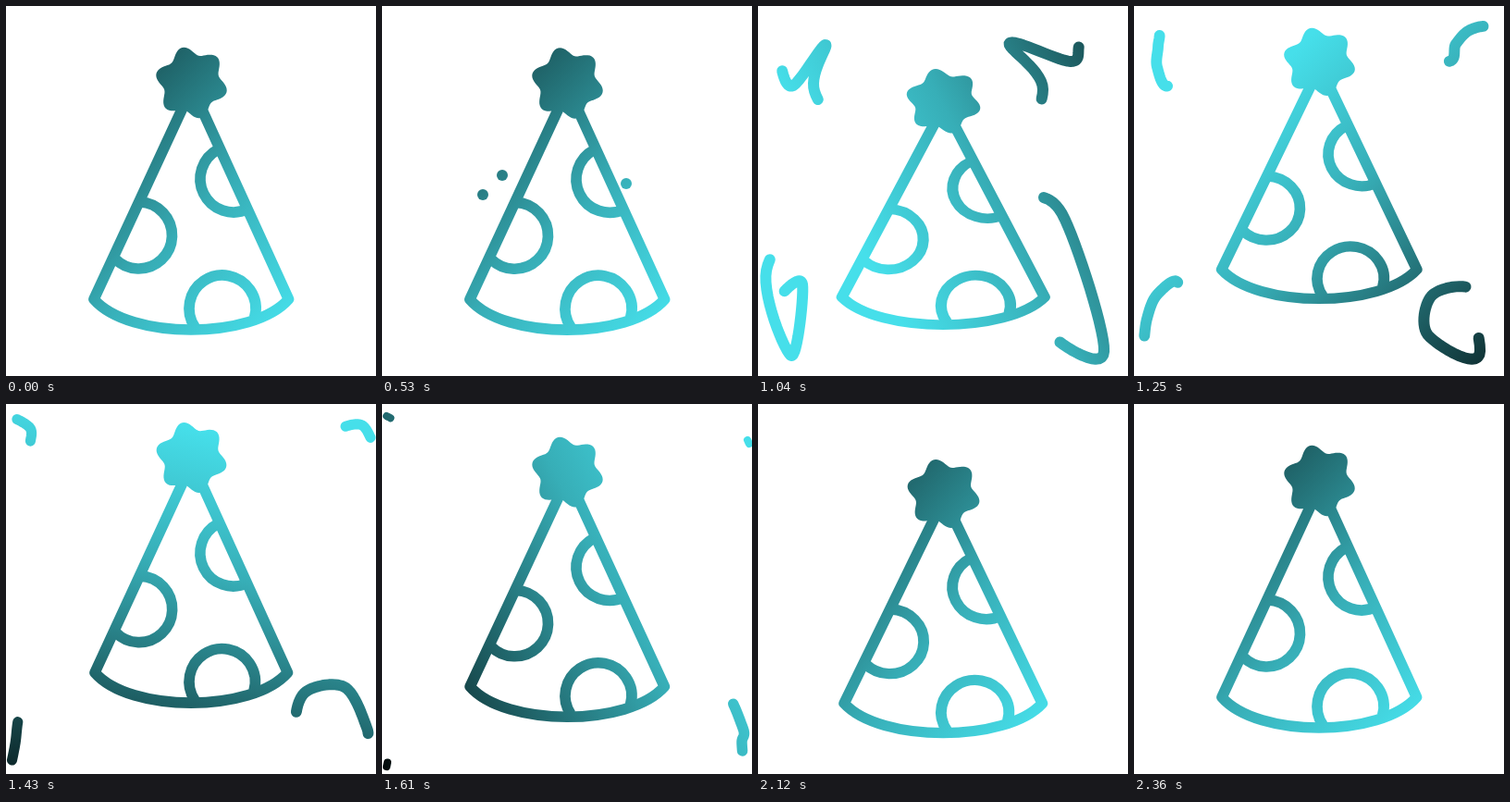
Animation, 400 px wide and 400 px high, one loop 2390 ms. Source, as an HTML page with a canvas:

```html
<!DOCTYPE html>
<html lang="en">
<head>
<meta charset="utf-8">
<title>Party hat</title>
<style>
  html, body { margin: 0; width: 100%; height: 100%; overflow: hidden; background: #fff; }
  canvas { display: block; width: 400px; height: 400px; }
</style>
</head>
<body>
<canvas id="stage" width="400" height="400"></canvas>
<script>
const ctx = document.getElementById('stage').getContext('2d');
const LOOP = 2390, START = 530, STEP = 30;
const STAR = 83, BRIM = 317, HEIGHT = BRIM - STAR;

const rad = deg => deg * Math.PI / 180;
const clamp = u => Math.max(0, Math.min(1, u));
const smooth = u => u * u * (3 - 2 * u);
const smoother = u => u * u * u * (u * (6 * u - 15) + 10);

// Eases in and out between [time, value] stops.
function bounce(t, stops) {
  let v = stops[0][1];
  for (let i = 1; i < stops.length; i++) {
    const [t0, v0] = stops[i - 1], [t1, v1] = stops[i];
    v += (v1 - v0) * smooth(clamp((t - t0) / (t1 - t0)));
  }
  return v;
}

// Crouch, jump, land, settle.
const starY = t => bounce(t, [[510, STAR], [850, 128], [1330, 55], [1990, 103], [2350, STAR]]);
const brimY = t => bounce(t, [[510, BRIM], [850, 337.5], [1270, 284.5], [1960, 327.5], [2350, BRIM]]);

// Each streamer runs along a spline through its points.
const streamers = [
  { start: 530, time: 1080, pts: [[130,183],[108,160],[61,92],[73,42],[38,86],[25,66],[26,44],[26,26],[5,13]] },
  { start: 530, time: 1080, pts: [[264,192],[274,172],[308,90],[272,40],[338,60],[348,41],[363,26],[385,23],[397,43]] },
  { start: 530, time: 1080, pts: [[109,204],[66,213],[9,286],[36,378],[48,301],[25,312],[14,338],[10,367],[5,392]] },
  { start: 690, time: 1190, pts: [[288,204],[330,227],[374,374],[318,356],[322,313],[366,306],[390,350],[389,366],[391,391]] }
];

// Catmull-Rom position at u.
function along(pts, u) {
  const last = pts.length - 1;
  const i = Math.min(Math.floor(u), last - 1), f = u - i;
  const p = k => pts[Math.max(0, Math.min(last, k))];
  return [0, 1].map(c => {
    const [a, b, d, e] = [p(i - 1)[c], p(i)[c], p(i + 1)[c], p(i + 2)[c]];
    return b + f / 2 * (d - a + f * (2 * a - 5 * b + 4 * d - e + f * (3 * (b - d) + e - a)));
  });
}

// The head leads, the tail catches up, and the line thins at the end.
function drawStreamer({ start, time, pts }, t) {
  const u = (t - start) / time, v = u / 1.083;
  if (u < 0 || v >= 1) return;
  const last = pts.length - 1;
  const head = last * smooth(clamp(u) ** 0.75);
  const tail = last * smooth(v ** 1.4);
  const n = Math.ceil((head - tail) * 14) + 1;
  ctx.lineWidth = 12 * (1 - 0.6 * v ** 8);
  ctx.lineCap = 'round';
  ctx.beginPath();
  for (let i = 0; i <= n; i++) {
    const [x, y] = along(pts, tail + (head - tail) * i / n);
    ctx.lineTo(x + i * 0.001, y);
  }
  ctx.stroke();
}

function arc(x, y, from, to) {
  ctx.beginPath();
  ctx.arc(x, y, 36, rad(from), rad(to));
  ctx.stroke();
}

function drawHat(t) {
  const top = starY(t), brim = brimY(t), height = brim - top;
  const sy = height / HEIGHT;
  const sx = 1 + (0.2 * (HEIGHT - height) + 0.05 * (brim - BRIM)) / 105;
  ctx.save();
  ctx.transform(sx, 0, 0, sy, 200 * (1 - sx), top - STAR * sy);
  ctx.lineWidth = 11.7;
  ctx.lineCap = 'butt';

  ctx.beginPath();
  ctx.moveTo(191, 110);
  ctx.lineTo(95, BRIM);
  ctx.bezierCurveTo(133, 361, 267, 361, 305.5, BRIM);
  ctx.lineTo(211, 110);
  ctx.stroke();

  arc(143.5, 248, -88, 136);
  arc(246, 187, 64, 242);
  arc(234, 327, 146, 376);

  // Six rounded points
  ctx.beginPath();
  for (let a = 0; a < 360; a += 3) {
    const r = 34.8 + 4.5 * Math.cos(rad(6 * (a - 15)));
    ctx.lineTo(200.5 + r * Math.cos(rad(a)), STAR + r * Math.sin(rad(a)));
  }
  ctx.fill();
  ctx.restore();
}

// Colours everything drawn so far with one gradient that makes a full turn.
function tint(t) {
  const u = clamp((t - START) / (LOOP - START));
  const a = rad(45 + 360 * smoother(u ** 0.73));
  const at = d => [245 + d * Math.cos(a), 190 + d * Math.sin(a)];
  const g = ctx.createLinearGradient(...at(-330), ...at(150));
  g.addColorStop(0, '#000');
  g.addColorStop(0.69, '#37aeb7');
  g.addColorStop(1, '#46dfea');
  ctx.save();
  ctx.globalCompositeOperation = 'source-in';
  ctx.fillStyle = g;
  ctx.fillRect(0, 0, 400, 400);
  ctx.restore();
}

function draw(now) {
  const ms = now % LOOP;
  const t = ms < START ? 0 : START + Math.floor((ms - START) / STEP) * STEP;
  ctx.clearRect(0, 0, 400, 400);
  ctx.lineJoin = 'round';
  drawHat(t);
  for (const s of streamers) drawStreamer(s, t);
  tint(t);
}

const begin = performance.now();
function tick() {
  draw(performance.now() - begin);
  requestAnimationFrame(tick);
}
tick();
</script>
</body>
</html>
```
